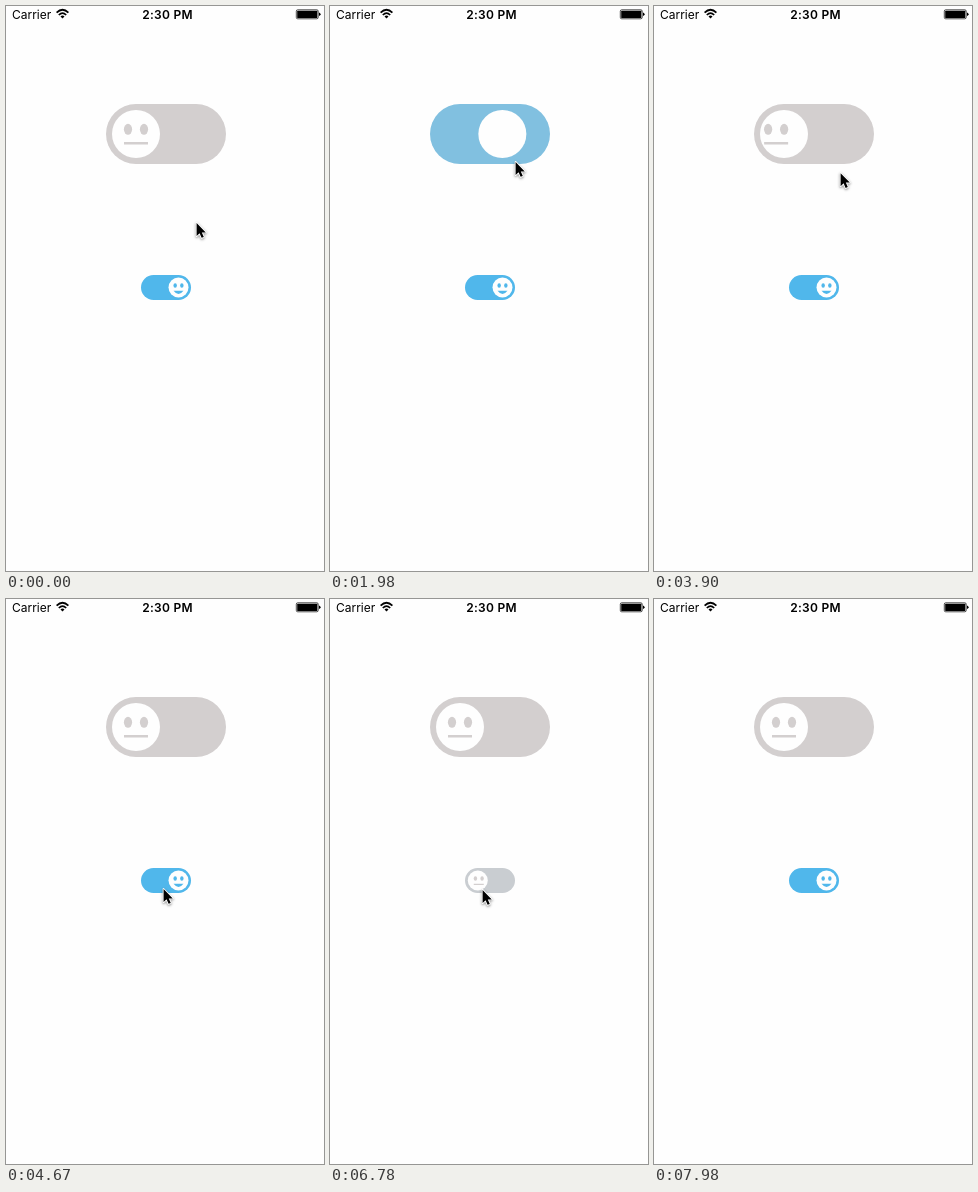
Animation of 318 by 565 pixels, one loop 8.84 s. Source, as an HTML page with a canvas:

```html
<!DOCTYPE html>
<html lang="en">
<head>
<meta charset="utf-8">
<title>Face switches</title>
<style>
  html, body { margin: 0; width: 100%; height: 100%; overflow: hidden; background: #fefefe; }
  canvas, svg { position: absolute; left: 0; top: 0; width: 318px; height: 565px; }
  text { font: 12px Inter, Roboto, sans-serif; }
  .time { font-weight: 600; letter-spacing: .3px; }
</style>
</head>
<body>
<svg viewBox="0 0 318 565">
  <text x="6" y="12.5">Carrier</text>
  <g fill="none" stroke="#000" stroke-width="1.7">
    <path d="M50.6 6.6Q56.5 .9 62.4 6.6"/>
    <path d="M52.8 9Q56.5 5.4 60.2 9"/>
  </g>
  <path d="M54.5 10.4Q56.5 8.7 58.5 10.4L56.5 12.6Z"/>
  <text class="time" x="161.6" y="12.5" text-anchor="middle">2:30 PM</text>
  <rect x="290.3" y="3.8" width="21.9" height="9" rx="1.4" fill="none" stroke="#000" stroke-width=".7"/>
  <rect x="291.2" y="4.7" width="20.1" height="7.2" rx=".5"/>
  <path d="M313 6.6Q314.6 7 314.6 8.3T313 10Z"/>
</svg>
<canvas id="stage"></canvas>
<script>
const W = 318, H = 565, LOOP = 8840;
const OFF = [211, 207, 207], ON = [80, 183, 235], PAPER = '#fefefe';
const canvas = document.getElementById('stage');
const ctx = canvas.getContext('2d');
const dpr = window.devicePixelRatio || 1;
canvas.width = W * dpr;
canvas.height = H * dpr;

const switches = [
  { x: 100, y: 98, scale: 1, span: 1120, flips: [{ at: 1515, on: true }, { at: 3120, on: false }] },
  { x: 135, y: 269, scale: 25 / 60, span: 600, flips: [{ at: 5370, on: false }, { at: 6750, on: true }] }
];

// time, x, y of the pointer tip
const pointerKeys = [
  [0, 190, 216], [335, 190, 216], [880, 185, 155], [3810, 185, 155],
  [3900, 186, 166], [4020, 187, 188], [4300, 178, 243], [4670, 157, 289],
  [4910, 153, 290], [5030, 152, 290], [7060, 152, 290], [7400, 222, 368],
  [7660, 289, 461], [7970, 296, 567]
];

const clamp = v => Math.min(1, Math.max(0, v));
const mix = (a, b, p) => a + (b - a) * p;
const rgb = (a, b, p) => `rgb(${a.map((v, i) => Math.round(mix(v, b[i], p))).join()})`;

// cubic-bezier(.42, 0, .58, 1)
function ease(t) {
  if (t <= 0 || t >= 1) return clamp(t);
  let lo = 0, hi = 1;
  for (let i = 0; i < 18; i++) {
    const u = (lo + hi) / 2, v = 1 - u;
    const x = 1.26 * u * v * v + 1.74 * u * u * v + u * u * u;
    if (x < t) lo = u; else hi = u;
  }
  return lo * lo * (3 - 2 * lo);
}

// monotone cubic through the pointer keys
function follow(t, axis) {
  const k = pointerKeys;
  let i = 0;
  while (i < k.length - 2 && t >= k[i + 1][0]) i++;
  const slope = j => j < 0 || j > k.length - 2 ? 0 : (k[j + 1][axis] - k[j][axis]) / (k[j + 1][0] - k[j][0]);
  const tangent = j => {
    if (j === k.length - 1) return slope(j - 1);
    const a = slope(j - 1), b = slope(j);
    return a * b > 0 ? 2 * a * b / (a + b) : 0;
  };
  const h = k[i + 1][0] - k[i][0], p = clamp((t - k[i][0]) / h), q = 1 - p;
  return k[i][axis] * q * q * (1 + 2 * p) + k[i + 1][axis] * p * p * (3 - 2 * p)
    + h * p * q * (q * tangent(i) - p * tangent(i + 1));
}

function pose(sw, t) {
  const flip = sw.flips.filter(f => f.at <= t).pop();
  if (!flip) return { knob: +!sw.flips[0].on, tint: +!sw.flips[0].on, shift: 0, smile: +!sw.flips[0].on, on: !sw.flips[0].on };
  const p = clamp((t - flip.at) / sw.span);
  const dir = flip.on ? 1 : -1;
  const toward = v => flip.on ? v : 1 - v;
  const leaving = p < 1 / 3;
  let shift;
  if (leaving) shift = mix(0, 48, ease(p * 3));
  else if (p < 2 / 3) shift = mix(-48, 8, ease(p * 3 - 1));
  else shift = mix(8, 0, ease(p * 3 - 2));
  const on = leaving ? !flip.on : flip.on;
  return {
    knob: toward(ease(p * 1.5)),
    tint: toward(clamp(p * 1.5)),
    shift: shift * dir,
    smile: !on ? 0 : leaving ? 1 : ease(clamp((p - 1 / 3) * 4)),
    on
  };
}

function drawFace(smile) {
  for (const x of [-8, 8]) {
    ctx.beginPath();
    ctx.ellipse(x, -4.7, 4.1, 5.5, 0, 0, Math.PI * 2);
    ctx.fill();
  }
  ctx.beginPath();
  if (smile > 0) {
    const depth = mix(2.6, 15.6, smile);
    ctx.moveTo(-12, 7.7);
    ctx.quadraticCurveTo(0, 7.7 + depth, 12, 7.7);
  } else {
    ctx.rect(-12, 8, 24, 2.6);
  }
  ctx.fill();
}

function drawSwitch(sw, t) {
  const s = pose(sw, t);
  ctx.save();
  ctx.translate(sw.x, sw.y);
  ctx.scale(sw.scale, sw.scale);
  ctx.fillStyle = rgb(OFF, ON, s.tint);
  ctx.beginPath();
  ctx.arc(30, 30, 30, Math.PI / 2, Math.PI * 1.5);
  ctx.arc(90, 30, 30, -Math.PI / 2, Math.PI / 2);
  ctx.fill();
  ctx.translate(mix(30, 90, s.knob), 30);
  ctx.beginPath();
  ctx.arc(0, 0, 24, 0, Math.PI * 2);
  ctx.fillStyle = PAPER;
  ctx.fill();
  ctx.clip();
  ctx.translate(s.shift, 0);
  ctx.fillStyle = rgb(OFF, ON, +s.on);
  drawFace(s.smile);
  ctx.restore();
}

const arrow = new Path2D('M.6 1V14L3.6 11.2L5.6 15.8L7.8 14.9L5.8 10.4H9.8Z');

function drawPointer(t) {
  if (t >= 7970) return;
  ctx.save();
  ctx.translate(follow(t, 1), follow(t, 2));
  ctx.lineJoin = 'round';
  ctx.lineWidth = 1.8;
  ctx.strokeStyle = '#fff';
  ctx.shadowColor = 'rgba(0,0,0,.45)';
  ctx.shadowBlur = 2.5 * dpr;
  ctx.shadowOffsetY = dpr;
  ctx.stroke(arrow);
  ctx.shadowColor = 'transparent';
  ctx.fillStyle = '#000';
  ctx.fill(arrow);
  ctx.restore();
}

function draw() {
  const t = performance.now() % LOOP;
  ctx.setTransform(dpr, 0, 0, dpr, 0, 0);
  ctx.clearRect(0, 0, W, H);
  switches.forEach(sw => drawSwitch(sw, t));
  drawPointer(t);
  requestAnimationFrame(draw);
}
draw();
</script>
</body>
</html>
```
